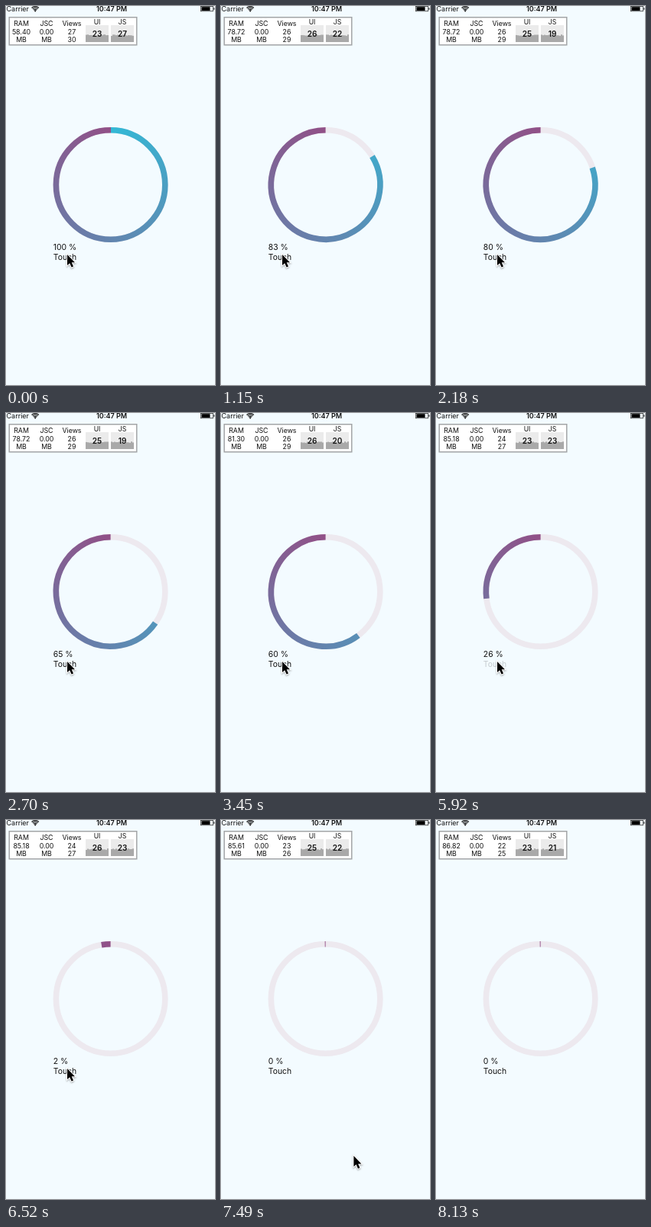
These frames come from a looping animation (273x494 px, 8.55 s). An HTML page with a canvas:

```html
<!DOCTYPE html>
<html lang="en">
<head>
<meta charset="utf-8">
<title>Circular progress</title>
<style>
  html, body { margin: 0; width: 100%; height: 100%; overflow: hidden; background: #f3fbff; }
  canvas { display: block; width: 273px; height: 494px; }
</style>
</head>
<body>
<canvas></canvas>
<script>
const W = 273, H = 494, LOOP = 8550, TAU = Math.PI * 2;
const canvas = document.querySelector('canvas');
const ctx = canvas.getContext('2d');
const dpr = window.devicePixelRatio || 1;
canvas.width = W * dpr;
canvas.height = H * dpr;

// [press, release] times; every release lowers the fill target by 20
const taps = [[590, 700], [2240, 2340], [3860, 4030], [5500, 5625], [5840, 5930]];

// Readouts that refresh about once a second
const memory = [['58.40', 27], ['78.72', 26], ['78.72', 26], ['81.30', 26], ['81.74', 25],
  ['83.46', 24], ['85.18', 24], ['85.61', 23], ['86.82', 22]];
const uiFps = [23, 24, 26, 25, 26, 24, 23, 26, 25, 23];
const jsFps = [27, 22, 19, 20, 19, 21, 23, 22, 21];

const clamp = x => Math.min(1, Math.max(0, x));
const smooth = x => { x = clamp(x); return x * x * (3 - 2 * x); };
const mix = (a, b, k) => a + (b - a) * k;
const noise = n => { const s = Math.sin(n * 127.1) * 43758.5453; return s - Math.floor(s); };

// Overdamped spring (stiffness 110.74, damping 31): x is the distance to rest
const SLOW = 4.12, FAST = 26.88;
function spring(x, v, s) {
  const a = (FAST * x + v) / (FAST - SLOW), b = x - a;
  const p = a * Math.exp(-SLOW * s), q = b * Math.exp(-FAST * s);
  return [p + q, -SLOW * p - FAST * q];
}

function fillAt(t) {
  let x = 100, v = 0;
  taps.forEach(([, start], i) => {
    if (t < start) return;
    const target = 80 - 20 * i;
    const end = Math.min(t, i + 1 < taps.length ? taps[i + 1][1] : LOOP);
    [x, v] = spring(x - target, v, (end - start) / 1000);
    x += target;
  });
  return x;
}

function touchOpacity(t) {
  const tap = taps.filter(([press]) => t >= press).pop();
  return tap ? mix(0.2, 1, smooth((t - tap[1]) / 250)) : 1;
}

function text(str, x, y, size, align = 'left', weight = 400) {
  ctx.font = `${weight} ${size}px Inter, Roboto, sans-serif`;
  ctx.textAlign = align;
  ctx.fillStyle = '#111';
  ctx.fillText(str, x, y);
}

function box(x, y, w, h, color) {
  ctx.fillStyle = color;
  ctx.fillRect(x, y, w, h);
}

function statusBar() {
  text('Carrier', 0.5, 7, 9);
  text('10:47 PM', 138, 7, 9, 'center', 600);
  ctx.strokeStyle = '#111';
  ctx.lineWidth = 1.3;
  for (const r of [2.6, 4.6, 6.6]) {
    ctx.beginPath();
    ctx.arc(38.2, 7.2, r, -Math.PI * 0.75, -Math.PI * 0.25);
    ctx.stroke();
  }
  ctx.beginPath();
  ctx.arc(38.2, 6.4, 1, 0, TAU);
  ctx.fill();
  ctx.lineWidth = 0.7;
  ctx.strokeRect(254.5, 0.4, 16, 6.4);
  box(255.5, 1.2, 11, 4.8, '#000');
  box(271.4, 2.4, 1, 2.4, '#111');
}

function column(x, lines) {
  lines.forEach((line, i) => text(line, x, 26 + 10.7 * i, 8.8, 'center'));
}

function fpsGraph(x, label, values, tick, seed) {
  text(label, x, 23.6, 8.6, 'center');
  box(x - 15, 25, 30, 22, '#ebebeb');
  for (let i = 0; i < 15; i++) {
    const h = 8 + 2 * noise(seed + tick + i);
    box(x - 15 + 2 * i, 47 - h, 2, h, '#a9a9a9');
  }
  text(values[tick], x, 40, 10, 'center', 600);
}

function perfMonitor(t) {
  const slow = Math.floor((t + 250) / 1000);
  const fast = Math.floor((t + 855) / 995);
  const [ram, views] = memory[Math.min(slow, 8)];
  box(3.5, 14, 168, 37.5, '#a3a5a7');
  box(5, 15.5, 165, 34.5, '#fff');
  column(20, ['RAM', ram, 'MB']);
  column(53, ['JSC', '0.00', 'MB']);
  column(86, ['Views', views, views + 3]);
  fpsGraph(119, 'UI', uiFps, Math.min(fast, 9), 3);
  fpsGraph(152, 'JS', jsFps, Math.min(slow, 8), 40);
}

function ring(fill) {
  const x = 136.6, y = 233, top = -TAU / 4;
  const arc = (from, color) => {
    ctx.beginPath();
    ctx.arc(x, y, 71.2, top + from * TAU, top + TAU);
    ctx.strokeStyle = color;
    ctx.stroke();
  };
  const tint = ctx.createConicGradient(top, x, y);
  tint.addColorStop(0, '#33b9d6');
  tint.addColorStop(1, '#915087');
  ctx.lineWidth = 7.6;
  arc(0, '#ede9ef');
  arc(1 - Math.max(fill, 0.2) / 100, tint);
}

function cursor(t) {
  if (t >= 8130) return;
  const a = smooth((t - 6950) / 600), b = smooth((t - 7550) / 580);
  ctx.save();
  ctx.translate(80 + 96 * a + 60 * b, 324 + 117 * a + 45 * b);
  ctx.shadowColor = 'rgba(0,0,0,.35)';
  ctx.shadowBlur = 2 * dpr;
  ctx.shadowOffsetY = dpr;
  const arrow = new Path2D('M0 0V14L3.2 11.2L5.6 16.6L8 15.5L5.7 10.3H10Z');
  ctx.lineWidth = 2;
  ctx.strokeStyle = '#fff';
  ctx.stroke(arrow);
  ctx.shadowColor = 'transparent';
  ctx.fillStyle = '#000';
  ctx.fill(arrow);
  ctx.restore();
}

function draw(t) {
  const fill = fillAt(t);
  ctx.setTransform(dpr, 0, 0, dpr, 0, 0);
  box(0, 0, W, H, '#f3fbff');
  statusBar();
  perfMonitor(t);
  ring(fill);
  text(`${Math.floor(fill)} %`, 61.8, 318.4, 10.4);
  ctx.globalAlpha = touchOpacity(t);
  text('Touch', 61.8, 331, 10.4);
  ctx.globalAlpha = 1;
  cursor(t);
}

const began = performance.now();
function frame() {
  draw((performance.now() - began) % LOOP);
  requestAnimationFrame(frame);
}
frame();
</script>
</body>
</html>
```
